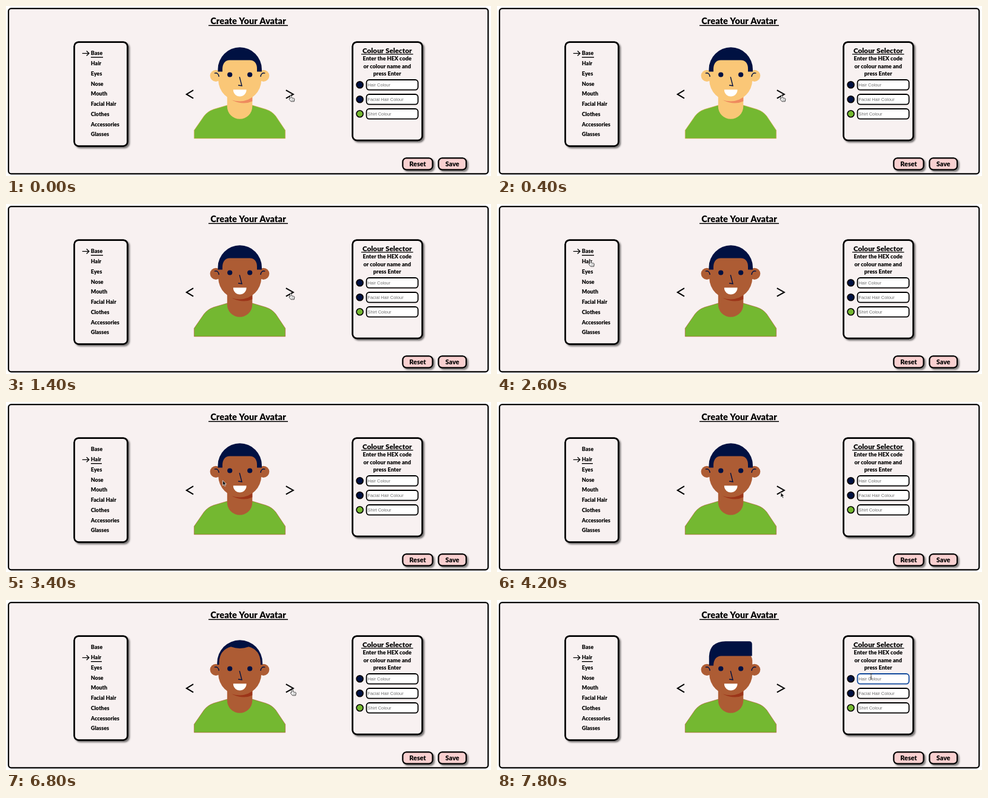
An HTML page with a canvas that plays this animation: 800x281 px, repeating every 8 s.

```html
<!DOCTYPE html>
<html lang="en">
<head>
<meta charset="utf-8">
<title>Create Your Avatar</title>
<style>
  html, body { margin: 0; width: 100%; height: 100%; overflow: hidden; background: #fff; }
  canvas { display: block; width: 800px; height: 281px; }
</style>
</head>
<body>
<canvas id="stage"></canvas>
<script>
const W = 800, H = 281, LOOP = 8000, STEP = 200;
const canvas = document.getElementById('stage');
const ctx = canvas.getContext('2d');
const dpr = window.devicePixelRatio || 1;
canvas.width = W * dpr;
canvas.height = H * dpr;

const PAPER = '#f8f1f1', INK = '#000', NAVY = '#001142', GREEN = '#74b831', PINK = '#f9d0d0';
const UI_FONT = 'Lato, "Open Sans", sans-serif';
const FIELD_FONT = '"Liberation Sans", Arial, sans-serif';
const MENU = ['Base', 'Hair', 'Eyes', 'Nose', 'Mouth', 'Facial Hair', 'Clothes', 'Accessories', 'Glasses'];
const FIELDS = [['Hair Colour', NAVY], ['Facial Hair Colour', NAVY], ['Shirt Colour', GREEN]];

const SKINS = [
  { at: 0, face: '#fac777', shade: '#ee8a5e', edge: '#e6a75c' },
  { at: 600, face: '#e3a092', shade: '#dd7c58', edge: '#d99a70' },
  { at: 1400, face: '#ad5c34', shade: '#9c3519', edge: '#b5502f' }
];
const HAIRS = [
  { at: 0, draw: shortHair },
  { at: 5200, draw: bunHair },
  { at: 6000, draw: shavedHair },
  { at: 7000, draw: quiffHair }
];
const POINTERS = [
  { at: 0, draw: hand }, { at: 1800, draw: arrowPointer },
  { at: 2400, draw: hand }, { at: 3000, draw: arrowPointer },
  { at: 4400, draw: hand }, { at: 7000, draw: arrowPointer },
  { at: 7400, draw: beam }
];
// time, x, y of the pointer
const ROUTE = [
  [0, 469.5, 148], [1600, 469.5, 148], [2400, 154, 93.5], [2800, 154, 93.5],
  [3800, 468, 149.5], [4200, 468, 149.5], [4400, 472, 148], [6800, 472, 148],
  [7400, 617, 126], [8000, 617, 126]
];

const current = (list, t) => list.filter(item => item.at <= t).pop();
const ease = u => u * u * (3 - 2 * u);

function shape(d, fill, stroke, width = 1) {
  const path = new Path2D(d);
  if (fill) { ctx.fillStyle = fill; ctx.fill(path); }
  if (stroke) { ctx.strokeStyle = stroke; ctx.lineWidth = width; ctx.stroke(path); }
}

function disc(x, y, r, fill, stroke, width = 1) {
  ctx.beginPath();
  ctx.arc(x, y, r, 0, Math.PI * 2);
  ctx.fillStyle = fill;
  ctx.fill();
  if (stroke) { ctx.strokeStyle = stroke; ctx.lineWidth = width; ctx.stroke(); }
}

function box(x, y, w, h, r, fill, stroke, width, shadow) {
  ctx.save();
  ctx.beginPath();
  ctx.roundRect(x, y, w, h, r);
  if (shadow) {
    ctx.shadowColor = 'rgba(0,0,0,.45)';
    ctx.shadowBlur = 3 * dpr;
    ctx.shadowOffsetX = ctx.shadowOffsetY = 2.5 * dpr;
  }
  ctx.fillStyle = fill;
  ctx.fill();
  if (shadow) {
    ctx.strokeStyle = stroke;
    ctx.lineWidth = width;
    ctx.stroke();
    ctx.shadowColor = 'transparent';
    ctx.fill();
  }
  ctx.strokeStyle = stroke;
  ctx.lineWidth = width;
  ctx.stroke();
  ctx.restore();
}

function label(text, x, y, size, align = 'center') {
  ctx.font = `900 ${size}px ${UI_FONT}`;
  ctx.textAlign = align;
  ctx.fillStyle = INK;
  ctx.fillText(text, x, y);
}

function rule(x1, x2, y, width) {
  shape(`M${x1} ${y}H${x2}`, null, INK, width);
}

function button(text, x, w) {
  box(x, 251.5, w, 19, 6, PINK, INK, 2, true);
  label(text, x + w / 2, 264.6, 10.8);
}

function menu(active) {
  box(112.7, 59.7, 87.6, 171.8, 7, PAPER, INK, 2.5, true);
  MENU.forEach((name, i) => label(name, 140, 81.3 + i * 16.75, 8.9, 'left'));
  const y = 78.3 + active * 17;
  rule(140, active ? 158 : 160, y + 6.4, 1.4);
  shape(`M125.8 ${y}H137M132.8 ${y - 4}L137 ${y}L132.8 ${y + 4}`, null, INK, 1.3);
}

function colourPanel(focused) {
  box(571.7, 59.7, 114.8, 162.3, 7, PAPER, INK, 2.5, true);
  label('Colour Selector', 628.7, 77.8, 11.7);
  rule(586, 671.5, 79.6, 1.2);
  label('Enter the HEX code', 628.7, 90.2, 9.1);
  label('or colour name and', 628.7, 102.7, 9.1);
  label('press Enter', 628.7, 115.2, 9.1);
  FIELDS.forEach(([name, colour], i) => {
    const y = 130.3 + i * 24;
    disc(583.6, y, 5.5, colour, INK, 1.6);
    box(594.6, y - 8.3, 85, 16.6, 4.5, '#fff', focused && i === 0 ? '#124a9c' : INK, 1.8);
    ctx.font = `7.4px ${FIELD_FONT}`;
    ctx.textAlign = 'left';
    ctx.fillStyle = '#6f6f6f';
    ctx.fillText(name, 596.5, y + 2.6);
  });
}

function shortHair() {
  shape('M349.5 108.5V104.5A36.2 36.2 0 0 1 421.9 104.5V108.5H414V104Q414 90 402 89.5H369Q357.5 90 357 104V108.5Z', NAVY);
}

function bunHair() {
  disc(385.6, 61.5, 14, NAVY);
  shape('M348.5 108.5V104.5A37.2 37.2 0 0 1 422.9 104.5V108.5H417V106Q416 96 404 93.5Q385.7 89 367 93.5Q355 96 354.5 106V108.5Z', NAVY);
}

function shavedHair(skin) {
  shape('M348.3 107V104A37.4 37.7 0 0 1 423.1 104V107Z', NAVY);
  shape('M351.5 108V104Q352 82.5 371 77.3Q385.7 82.5 400.4 77.3Q419.4 82.5 419.9 104V108Z', skin.face);
}

function quiffHair() {
  shape('M349.8 108.5V93Q351 68.5 377 68.2H416Q420.7 68.2 420.7 73V92.5H370Q357.5 93 357 108.5Z', NAVY);
}

function avatar(skin, hair) {
  shape('M310.3 219V205.5L326.5 182Q332.5 174 343 170.5L365 164H406.3L428 170.5Q439 174 445 182L460.7 205.5V219Z', GREEN, skin.edge, .6);
  shape('M364.8 140H406.3V166A20.75 20.75 0 0 1 364.8 166Z', skin.face);
  shape('M372 155.2Q392 161 406.3 149V157.5Q391 164.5 372 155.2Z', skin.shade);
  disc(346.2, 115.3, 9.6, skin.face);
  disc(424.7, 115.3, 9.6, skin.face);
  shape('M350.2 122V100Q351 82 385.7 82Q420.4 82 421.2 100V122A35.5 35.5 0 0 1 350.2 122Z', skin.face);
  hair(skin);
  shape('M343.8 111.2Q350.4 109.3 351.2 117M427.4 111.2Q420.8 109.3 420 117', null, NAVY, 1.4);
  disc(369.2, 113.5, 4.1, NAVY);
  disc(402.2, 113.5, 4.1, NAVY);
  shape('M385.2 117.3L389 131.8L383 131', null, NAVY, 1.4);
  shape('M374.8 138.2H396.6A10.9 11.3 0 0 1 374.8 138.2Z', '#fff');
}

function hand() {
  shape('M-1 1Q-1-.6.2-.6T1.4 1V4L5.3 4.6Q6.5 4.9 6.4 6.2L5.7 9.8H.5L-2.3 6.4Q-2.9 5.2-1.8 4.9L-1 5.4Z', '#fff', '#111', .8);
  shape('M1.5 6.4V8.4M3.1 6.4V8.4M4.6 6.4V8.4', null, '#333', .5);
}

function arrowPointer() {
  shape('M0 0V8.2L1.9 6.5L3.2 9.4L4.7 8.7L3.4 5.9H6Z', '#111', '#fff', .7);
}

function beam() {
  shape('M-2-4.6Q0-4.6 0-3.4Q0-4.6 2-4.6M0-3.4V3.8M-2 5Q0 5 0 3.8Q0 5 2 5M-1 1.6H1', null, '#333', .9);
}

function pointer(t) {
  const i = Math.max(1, ROUTE.findIndex(k => k[0] > t));
  const [t0, x0, y0] = ROUTE[i - 1], [t1, x1, y1] = ROUTE[i];
  const u = ease((t - t0) / (t1 - t0));
  ctx.save();
  ctx.translate(x0 + (x1 - x0) * u, y0 + (y1 - y0) * u);
  current(POINTERS, t).draw();
  ctx.restore();
}

function draw(now) {
  const t = Math.floor((now % LOOP) / STEP) * STEP;
  ctx.setTransform(dpr, 0, 0, dpr, 0, 0);
  ctx.fillStyle = '#fff';
  ctx.fillRect(0, 0, W, H);
  box(4.1, 4.1, 791.2, 273.2, 4.5, PAPER, INK, 2.2);
  label('Create Your Avatar', 399.5, 29.8, 14.6);
  rule(334, 465, 32.2, 1.4);
  menu(t >= 2800 ? 1 : 0);
  colourPanel(t >= 7600);
  button('Reset', 654.5, 49);
  button('Save', 713.5, 45.5);
  shape('M309 139.2L297.8 145.9L309 152.6M461.8 139.2L473.8 145.9L461.8 152.6', null, INK, 2);
  avatar(current(SKINS, t), current(HAIRS, t).draw);
  pointer(t);
}

const start = performance.now();
function tick() {
  draw(performance.now() - start);
  requestAnimationFrame(tick);
}
tick();
</script>
</body>
</html>
```
